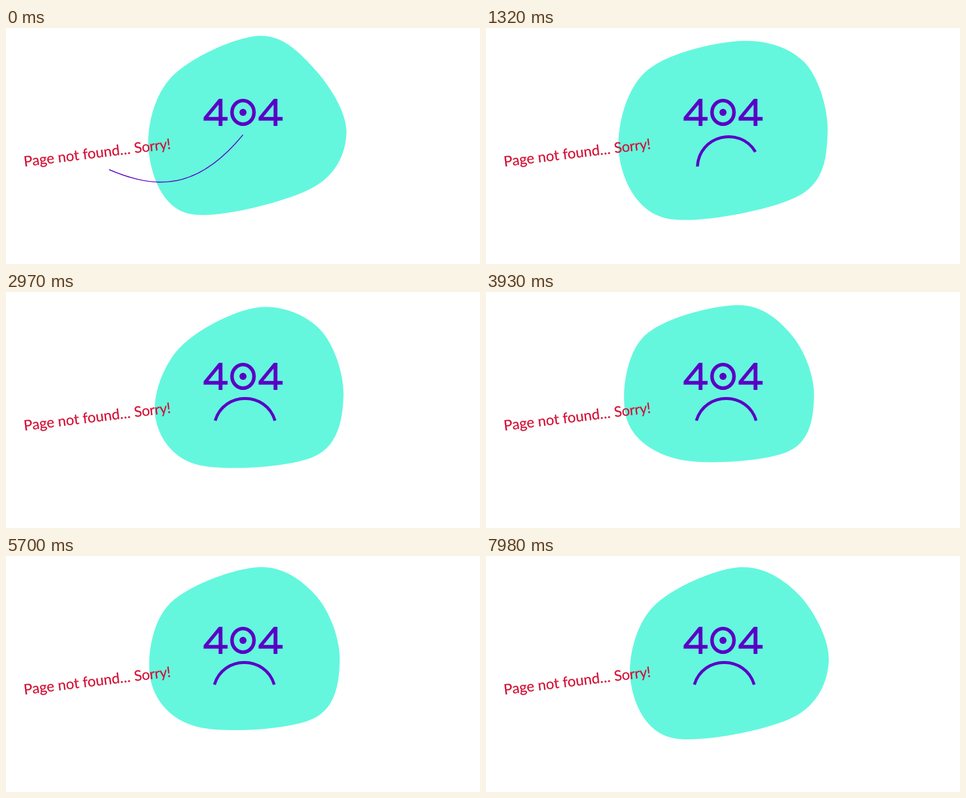
An HTML page for the animation above (8000 ms loop, 800 px wide and 400 px high).

```html
<!DOCTYPE html>
<html lang="en">
<head>
<meta charset="utf-8">
<title>404</title>
<style>
  html, body { margin: 0; width: 100%; height: 100%; overflow: hidden; background: #fff; }
  svg { display: block; width: 800px; height: 400px; }
  text { font: 24.4px Lato, "Open Sans", sans-serif; fill: #d31135; stroke: #d31135; stroke-width: .25px; }
  .dots { letter-spacing: .4px; }
  .sorry { letter-spacing: -.4px; }
</style>
</head>
<body>
<svg viewBox="0 0 800 400">
  <path id="blob" fill="#64f7de"/>
  <g fill="#5a00c5" role="img" aria-label="404">
    <path id="four" fill-rule="evenodd" d="M359.3 120H365.3V150.7H374V157H365.3V166H358.8V157H333.5V151.6ZM358.8 129.8L341.6 150.7H358.8Z"/>
    <use href="#four" x="92.8"/>
    <ellipse cx="400" cy="143" rx="18.6" ry="20" fill="none" stroke="#5a00c5" stroke-width="6"/>
    <circle cx="400" cy="143" r="6"/>
  </g>
  <path id="mouth" fill="none" stroke="#5a00c5"/>
  <text transform="translate(31 235) rotate(-7)">Page not found<tspan class="dots">...</tspan> <tspan class="sorry">Sorry!</tspan></text>
</svg>
<script>
const LOOP = 8000;
const CENTER = [400, 165];

// The blob is a closed spline through seven knots that slide along fixed rays
const RAYS = [4, 43, 121, 163, 213.5, 280, 322].map(deg => deg * Math.PI / 180);
const POSES = [
  { at: 0,    radii: [175, 157, 175, 166, 146, 154, 154] },
  { at: 1320, radii: [177, 175, 184, 183, 160, 145, 174] },
  { at: 2970, radii: [170, 166, 149, 155, 128, 141, 165] },
  { at: 3930, radii: [154, 153, 139, 170, 161, 145, 148] },
  { at: 4890, radii: [148, 153, 145, 169, 170, 153, 146] },
  { at: 6540, radii: [180, 170, 148, 157, 130, 143, 168] },
  { at: 7980, radii: [179, 160, 167, 163, 142, 148, 162] }
];

// Cubic curves of the mouth before and after it falls into place
const SMILE = [174, 240, 255, 275, 324, 274, 400, 181];
const FROWN = [353, 218, 368, 168, 439, 168, 454, 218];
const SETTLED = 1320;
const PIVOT = "422 211";

const clamp = u => Math.min(1, Math.max(0, u));
const mix = (a, b, u) => a + (b - a) * u;

function radiiAt(time) {
  const pose = k => POSES[Math.min(POSES.length - 1, Math.max(0, k))];
  const next = Math.max(1, POSES.findIndex(p => p.at > time));
  const i = time >= pose(Infinity).at ? POSES.length - 2 : next - 1;
  const span = pose(i + 1).at - pose(i).at;
  const u = clamp((time - pose(i).at) / span);
  return RAYS.map((_, n) => {
    const speed = k => (pose(k + 1).radii[n] - pose(k - 1).radii[n]) / (pose(k + 1).at - pose(k - 1).at);
    const push = speed(i) * (1 - u) - speed(i + 1) * u;
    const eased = u * u * (3 - 2 * u);
    return mix(pose(i).radii[n], pose(i + 1).radii[n], eased) + span * u * (1 - u) * push;
  });
}

function blobPath(time) {
  const radii = radiiAt(time);
  const knots = RAYS.map((a, k) => [
    CENTER[0] + radii[k] * Math.cos(a),
    CENTER[1] + radii[k] * Math.sin(a)
  ]);
  const at = k => knots[(k + knots.length) % knots.length];
  const handle = (k, side) => at(k).map((p, axis) => p + side * (at(k + 1)[axis] - at(k - 1)[axis]) / 6);
  return `M${at(0)}` + knots.map((_, k) => `C${handle(k, 1)} ${handle(k + 1, -1)} ${at(k + 1)}`).join("") + "Z";
}

const blob = document.getElementById("blob");
const mouth = document.getElementById("mouth");

function drawMouth(time) {
  const fall = clamp(time / SETTLED) ** 4;
  const swing = -75 * Math.exp(-(((time - 1040) / 218) ** 2));
  const shake = 2 * clamp((time - SETTLED) / 800) * Math.sin((time - 2970) / 757 * 2 * Math.PI);
  const [x, y, ...curve] = SMILE.map((p, k) => mix(p, FROWN[k], fall));
  mouth.setAttribute("d", `M${x} ${y}C${curve.join(" ")}`);
  mouth.setAttribute("stroke-width", mix(1.4, 4.9, fall));
  mouth.setAttribute("transform", `translate(${shake} 0) rotate(${swing} ${PIVOT})`);
}

function draw(time) {
  blob.setAttribute("d", blobPath(time));
  drawMouth(time);
}

const start = performance.now();
function frame() {
  draw((performance.now() - start) % LOOP);
  requestAnimationFrame(frame);
}
draw(0);
requestAnimationFrame(frame);
</script>
</body>
</html>
```
